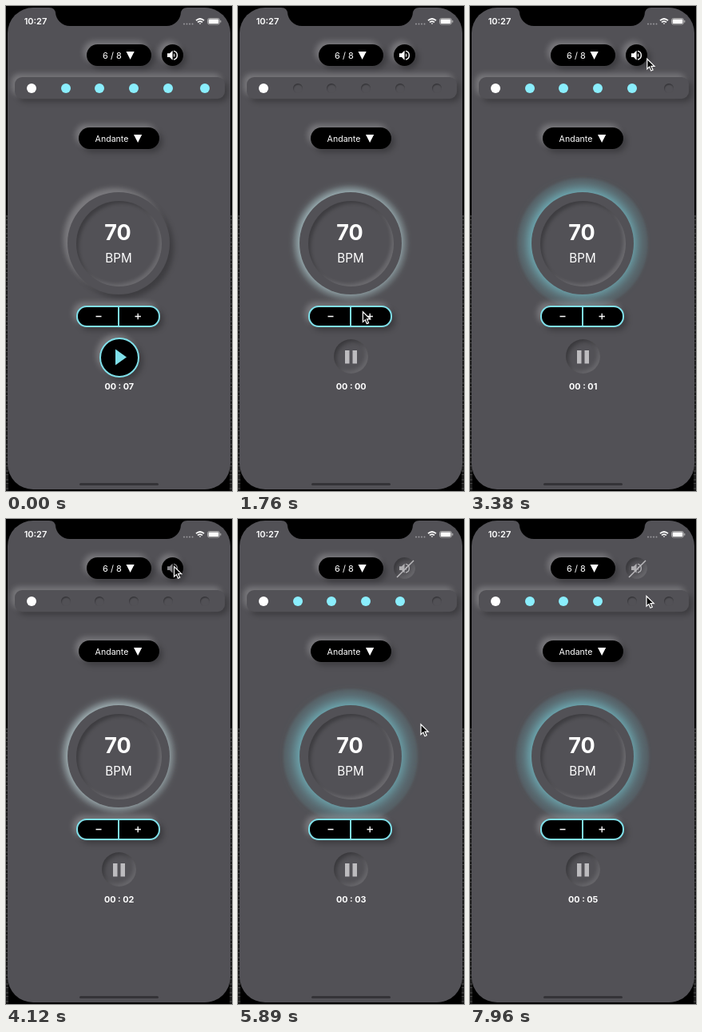
An HTML page that plays this animation: 283x607 px, repeating every 8000 ms.

```html
<!DOCTYPE html>
<html lang="en">
<head>
<meta charset="utf-8">
<title>Metronome</title>
<style>
  html, body { margin: 0; width: 100%; height: 100%; overflow: hidden; background: #000; }
  :root { --bg: #525156; --cyan: #7fdfe9; }
  div, svg { position: absolute; box-sizing: border-box; }
  #stage { left: 0; top: 0; width: 283px; height: 607px; overflow: hidden; background: #000; }
  .edge { top: 262px; width: 3px; height: 345px;
    background: repeating-linear-gradient(#333 0 2px, #141414 2px 5px, #444 5px 6px, #1b1b1b 6px 11px); }
  #screen { left: 2px; top: 2px; width: 279px; height: 603px; border-radius: 32px; background: var(--bg); }
  #notch { left: 62px; top: 0; width: 157px; height: 25px; background: #000; border-radius: 0 0 18px 18px; }
  #home { left: 92px; top: 597px; width: 99px; height: 3px; border-radius: 2px; background: #343337; }
  .raised { box-shadow: -4px -4px 7px rgba(255,255,255,.23), 4px 4px 7px rgba(0,0,0,.27); }
  .sunk { box-shadow: inset 3px 3px 5px rgba(0,0,0,.3), inset -3px -3px 5px rgba(255,255,255,.13); }
  .pill { height: 27px; border-radius: 14px; background: #000; }
  #meter { left: 101px; top: 48px; width: 81px; }
  #tempo { left: 91px; top: 152px; width: 101px; }
  #sound, #muted { left: 195px; top: 48px; width: 27px; }
  #bar { left: 11px; top: 89px; width: 263px; height: 27px; border-radius: 9px; background: var(--bg); }
  .dot { top: 96.5px; width: 12px; height: 12px; border-radius: 50%; background: var(--bg);
    box-shadow: inset .5px 1.5px 1.5px rgba(0,0,0,.36); }
  .dot.on { background: #8aeefd; box-shadow: none; }
  .dot.on.first { background: #fff; }
  #dial { left: 77px; top: 233px; width: 128px; height: 128px; border-radius: 50%; background: var(--bg); }
  #well { left: 88px; top: 244px; width: 107px; height: 107px; border-radius: 50%;
    box-shadow: inset 4px 4px 4px -1px rgba(0,0,0,.25), inset -4px -4px 4px -1px rgba(255,255,255,.14); }
  #step { left: 88px; top: 374.5px; width: 105px; height: 27.5px; border-radius: 13px;
    background: #000; border: 2px solid var(--cyan); }
  #play { left: 116.5px; top: 414.5px; width: 50px; height: 50px; border-radius: 50%;
    background: #000; border: 2px solid var(--cyan); }
  #pause { left: 120px; top: 417px; width: 43px; height: 43px; border-radius: 50%; }
  #art { left: 0; top: 0; }
  text { font-family: Inter, Roboto, sans-serif; fill: #fff; text-anchor: middle; }
</style>
</head>
<body>
<div id="stage">
  <div class="edge" style="left:0"></div>
  <div class="edge" style="right:0"></div>
  <div id="screen"></div>
  <div id="notch"></div>
  <div id="home"></div>
  <div id="meter" class="pill raised"></div>
  <div id="sound" class="pill raised"></div>
  <div id="muted" class="pill sunk" style="background:var(--bg)"></div>
  <div id="bar" class="raised"></div>
  <div id="tempo" class="pill raised"></div>
  <div id="dial"></div>
  <div id="well"></div>
  <div id="step" class="raised"></div>
  <div id="play" class="raised"></div>
  <div id="pause" class="sunk"></div>
  <svg id="art" width="283" height="607" viewBox="0 0 283 607">
    <path d="M54 2H62V10Q62 2 54 2ZM227 2H219V10Q219 2 227 2Z"/>
    <text x="37" y="23" font-size="11" font-weight="600">10:27</text>
    <g fill="#99989c">
      <circle cx="223" cy="22.5" r="1"/><circle cx="226.5" cy="22.5" r="1"/>
      <circle cx="230" cy="22.5" r="1"/><circle cx="233.5" cy="22.5" r="1"/>
    </g>
    <g fill="none" stroke="#fff" stroke-width="1.8">
      <path d="M238 18.2Q243 13.7 248 18.2M240 20.4Q243 17.8 246 20.4"/>
      <path d="M241.6 21.6h2.8L243 23z" fill="#fff" stroke="none"/>
    </g>
    <rect x="252.5" y="15.5" width="15" height="7.5" rx="2.2" fill="none" stroke="#bbb" stroke-width=".8"/>
    <rect x="253.6" y="16.6" width="12.8" height="5.3" rx="1.2" fill="#fff"/>
    <path d="M268.8 18v2.6" stroke="#bbb"/>

    <text x="133" y="66" font-size="11">6 / 8</text>
    <text x="132.5" y="170" font-size="10.6">Andante</text>
    <path d="M150.5 57h10.2l-5.1 10zM160 161h10.2l-5.1 10z" fill="#fff"/>

    <g id="speaker">
      <path d="M202 59.3h3l3.6-3.6v12l-3.6-3.6h-3z"/>
      <path d="M210 59q2.4 2.7 0 5.4z"/>
      <path d="M210 56.4a5.4 5.4 0 0 1 0 10.6" fill="none" stroke="currentColor" stroke-width="1.4"/>
      <path id="slash" d="M199 73L220 52" stroke="#bdbcbf" stroke-width="1.4"/>
    </g>

    <text x="140" y="293.3" font-size="27" font-weight="700">70</text>
    <text x="141" y="321" font-size="15.2">BPM</text>
    <path d="M141 376v25" stroke="#7fdfe9" stroke-width="2"/>
    <path d="M112.5 388.5h7M161.5 388.5h7.4M165.2 384.8v7.4" stroke="#fff" stroke-width="1.3"/>
    <path id="triangle" d="M137 429.5L151 439.5L137 449.5z" fill="#7fdfe9"/>
    <path id="bars" d="M134 431h5.5v16.5h-5.5zM143.5 431h5.5v16.5h-5.5z" fill="#bdbcbf"/>
    <text id="clock" x="141.7" y="480" font-size="10.8" font-weight="700"></text>
    <path id="cursor" d="M0 0V12.6L2.9 9.9L5 14.8L7.2 13.8L5.1 9.1H9.2Z" fill="#000" stroke="#fff" stroke-width="1.2"/>
  </svg>
</div>
<script>
  const LOOP = 8000, TICK = 147.3;
  const PRESS = 1100, RESET = 1250, FIRST_BEAT = 1440, BEAT = 60000 / 140;
  const CLOCK_ZERO = 2040, MUTE_PRESS = 4050, MUTED = 4200;
  const PULSE = 2680, PULSE_LOW = 6950;

  // time, x, y of the pointer tip
  const pointerPath = [
    [440, 290, 545], [1000, 133, 445], [1500, 133, 445], [2500, 265.5, 92.5],
    [2900, 262, 90], [3600, 210.5, 59.5], [4270, 210.5, 59.5],
    [4720, 220, 165], [5100, 229, 257], [7080, 229, 257], [7900, 221, 96.5], [8000, 221, 96.5]
  ];

  const $ = id => document.getElementById(id);
  const clamp = v => Math.min(1, Math.max(0, v));
  const mix = (a, b, p) => a + (b - a) * p;
  const ease = p => p * p * (3 - 2 * p);
  const show = (id, on) => { $(id).style.visibility = on ? "visible" : "hidden"; };

  const dots = [32, 74.5, 117, 160, 202.5, 248.5].map((x, i) => {
    const dot = document.createElement("div");
    dot.className = i ? "dot" : "dot first";
    dot.style.left = x - 6 + "px";
    $("stage").insertBefore(dot, $("tempo"));
    return dot;
  });

  function pointerAt(t) {
    const i = Math.max(1, pointerPath.findIndex(k => k[0] >= t));
    const [a, b] = [pointerPath[i - 1], pointerPath[i]];
    const p = ease(clamp((t - a[0]) / (b[0] - a[0])));
    return [mix(a[1], b[1], p), mix(a[2], b[2], p)];
  }

  function dialShadow(t) {
    if (t < PRESS) return "-5px -5px 6px rgba(255,255,255,.24), 5px 5px 6px rgba(0,0,0,.25)";
    // triangle wave, 0 at PULSE_LOW and 1 half a pulse later
    const cycles = (t - PULSE_LOW) / PULSE;
    const glow = 2 * Math.abs(cycles - Math.round(cycles));
    const tint = clamp(glow * 2.6);
    const rgb = [[235, 125], [235, 218], [235, 230]].map(([a, b]) => Math.round(mix(a, b, tint)));
    return `-1px -1px ${mix(10, 21, glow)}px ${mix(1.5, 3.2, glow)}px rgba(${rgb},${mix(.8, .83, glow)}),
      0 0 3px ${mix(6, 24, glow)}px rgba(${rgb},${mix(.04, .12, glow)})`;
  }

  function draw(t) {
    const playing = t >= PRESS;
    show("play", !playing);
    show("triangle", !playing);
    show("pause", playing);
    show("bars", playing);
    $("dial").style.boxShadow = dialShadow(t);

    const beat = Math.floor((t - FIRST_BEAT) / BEAT);
    const lit = t < RESET ? 6 : beat < 0 ? 0 : beat % 6 + 1;
    dots.forEach((dot, i) => dot.classList.toggle("on", i < lit));

    const seconds = t < RESET ? 7 : Math.max(0, Math.floor((t - CLOCK_ZERO) / 1000));
    $("clock").textContent = `00 : 0${seconds}`;

    const muted = t >= MUTED;
    show("sound", !muted);
    show("muted", muted);
    show("slash", muted);
    $("speaker").style.color = $("speaker").style.fill = muted ? "#afaeb1" : t >= MUTE_PRESS ? "#88878a" : "#fff";

    show("cursor", t >= pointerPath[0][0]);
    $("cursor").setAttribute("transform", `translate(${pointerAt(t)})`);
  }

  const start = performance.now();
  function frame() {
    const t = (performance.now() - start) % LOOP;
    draw(Math.floor((t + 14) / TICK) * TICK);
    requestAnimationFrame(frame);
  }
  frame();
</script>
</body>
</html>
```
